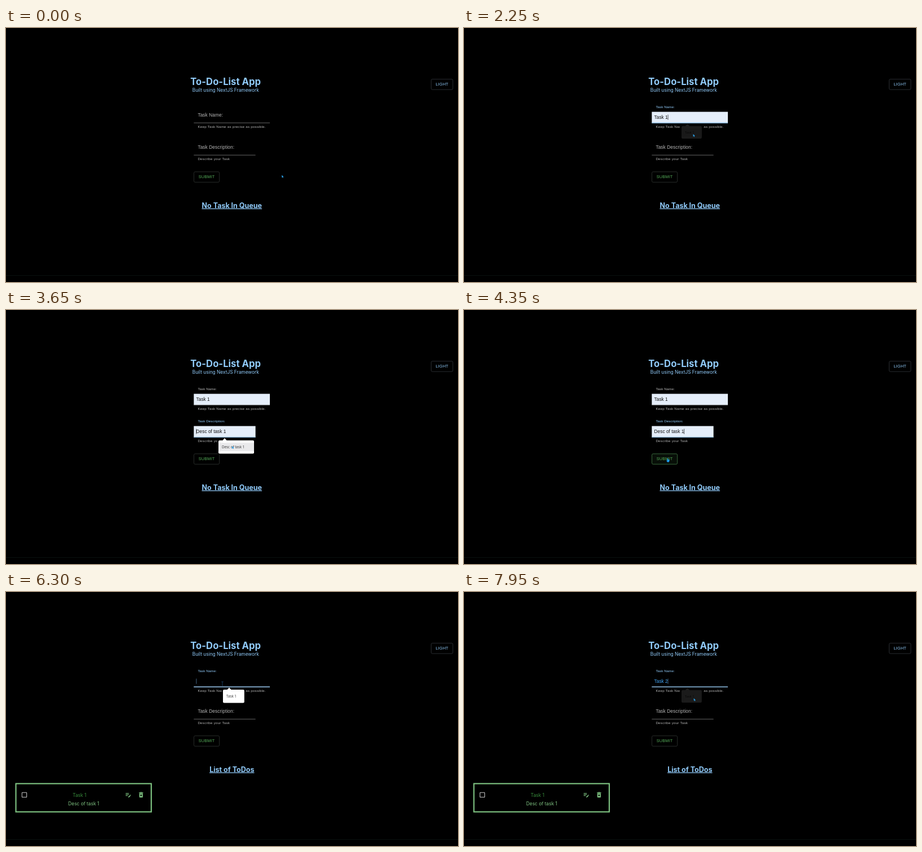
Write an HTML page that moves like this. It is 800 px wide and 450 px high and loops after 8000 ms.

```html
<!DOCTYPE html>
<html lang="en">
<head>
<meta charset="utf-8">
<title>To-Do-List App</title>
<style>
html, body { margin: 0; width: 100%; height: 100%; overflow: hidden; background: #000; }
svg { display: block; width: 100vw; height: 100vh; }
text { white-space: pre; }
.inter { font-family: Inter, sans-serif; font-size: 8.33px; }
.bold { font-weight: 700; }
.mid { text-anchor: middle; }
.ui { font-family: "Liberation Sans", Arial, sans-serif; font-size: 8.33px; }
.label { letter-spacing: .00938em; }
.help { font-size: 6.25px; letter-spacing: .0333em; fill: #b5b5b5; }
.btn { font-size: 7.29px; letter-spacing: .02857em; }
.tip { font-family: "Open Sans", sans-serif; font-size: 6.25px; fill: #333; }
</style>
</head>
<body>
<svg id="stage" viewBox="0 0 800 450"></svg>
<script>
const LOOP = 8000, STEP = 50;
const BLUE = '#90caf9', GREEN = '#81c784', GREY = '#b5b5b5';

const field = (id, y, w, label, help) => `
  <g id="${id}" transform="translate(332.4 ${y})">
    <rect class="fill" y="-19.5" width="${w}" height="19.8" fill="#e5eefa"/>
    <line class="line" x2="${w}" y1=".1" y2=".1" stroke-width=".6"/>
    <line class="focus" x1="${-w / 2}" x2="${w / 2}" stroke="${BLUE}" stroke-width="1.1"/>
    <text class="label ui">${label}</text>
    <text class="value ui" x="4.2" y="-6.9"></text>
    <rect class="caret" y="-14.5" width=".7" height="9.2"/>
    <text class="ui help" x="7" y="9.4">${help}</text>
  </g>`;

const popup = (id, x, y, w, text) => `
  <g id="${id}" transform="translate(${x} ${y})">
    <rect x="-2" y="-1" width="${w + 4}" height="25.5" rx="2" fill="#000"/>
    <g class="body">
      <path d="M7 .5L11-3.8L15 .5z" fill="#fff"/>
      <rect width="${w}" height="23.6" rx="2" fill="#fff"/>
      <rect class="band" y="4.5" width="${w}" height="14.6" fill="#e9e9eb"/>
      <text class="tip" x="6" y="14.2">${text}</text>
    </g>
  </g>`;

const stage = document.getElementById('stage');
stage.innerHTML = `
  <rect width="800" height="450"/>
  <rect y="438" width="800" height="1" fill="#08100f"/>
  <text class="inter bold mid" x="388.6" y="101" style="font-size:16.67px" fill="${BLUE}">To-Do-List App</text>
  <text class="inter mid" x="388.8" y="113" fill="${BLUE}">Built using NextJS Framework</text>
  <rect x="752.5" y="90.7" width="38.4" height="18.4" rx="2" fill="none" stroke="#3b4046" stroke-width=".7"/>
  <text class="ui btn mid" x="771.8" y="102.2" fill="${BLUE}">LIGHT</text>
  <rect id="btn" x="332.6" y="254.8" width="45" height="18.4" rx="2" fill="#66bb6a" stroke-width=".7"/>
  <text class="ui btn mid" x="355.1" y="266.4" fill="#57b05b">SUBMIT</text>
  <text id="head" class="inter bold mid" x="399.8" y="318.6" style="font-size:12.5px" text-decoration="underline" fill="${BLUE}"></text>
  <g id="card">
    <rect x="17.5" y="339.5" width="239.6" height="50" fill="none" stroke="${GREEN}" stroke-width="2.1"/>
    <rect x="28.3" y="355.3" width="8.3" height="8.3" rx=".7" fill="none" stroke="#c4c4c4" stroke-width="1.05"/>
    <text class="inter mid" x="130" y="362.5" fill="#388e3c">Task 1</text>
    <text class="inter mid" x="137.5" y="378.4" fill="${GREEN}">Desc of task 1</text>
    <g fill="${GREEN}">
      <path transform="translate(210.2 353) scale(.521)" d="M3 10h11v2H3zM3 6h11v2H3zM3 14h7v2H3zM18 12.9l.7-.7q.7-.6 1.4 0l.7.7q.6.7 0 1.4l-.7.7zM17.3 13.6L12 18.9V21h2.1l5.3-5.3z"/>
      <path transform="translate(232.8 353) scale(.521)" fill-rule="evenodd" d="M6 7h12v12q0 2-2 2H8q-2 0-2-2zM8.5 11.9L10.6 14 8.5 16.1 9.9 17.5 12 15.4 14.1 17.5 15.5 16.1 13.4 14 15.5 11.9 14.1 10.5 12 12.6 9.9 10.5zM15.5 4l-1-1h-5l-1 1H5v2h14V4z"/>
    </g>
  </g>
  ${field('name', 168, 134.6, 'Task Name:', 'Keep Task Name as precise as possible.')}
  ${field('desc', 225.1, 109.2, 'Task Description:', 'Describe your Task')}
  ${popup('nameTip', 384, 173, 37.8, 'Task 1')}
  ${popup('descTip', 376, 230.9, 63, 'Desc of task 1')}
  <g id="pointer">
    <path id="arrow" d="M0 0L.2 4.6 1.3 3.7 2 5.2 2.8 4.8 2.1 3.4 3.5 3.2z" fill="#2b9fe6"/>
    <path id="beam" d="M-1.8-3.3H1.8M0-3.3V3.5M-1 3.5H1" fill="none" stroke="#23507c" stroke-width=".7"/>
    <path id="hand" d="M-1.2-2.8H-.1V-.8L2.6-.1V2L1.7 4H-1.2L-2.7 1.4 -2.2.8-1.2 1.4z" fill="#1e9df0"/>
  </g>`;

const $ = id => document.getElementById(id);
const set = (el, attrs) => { for (const k in attrs) el.setAttribute(k, attrs[k]); };
const show = (el, on) => set(el, { visibility: on ? 'visible' : 'hidden' });
const clamp = v => Math.max(0, Math.min(1, v));
const easeOut = v => 1 - (1 - clamp(v)) ** 3;
const easeBoth = v => v * v * (3 - 2 * v);
const within = (t, spans) => spans.some(([a, b]) => t >= a && t < b);
// 0..1 level that eases in and out at the ends of each span
const level = (t, spans, ms) => spans.reduce(
  (sum, [a, b]) => sum + easeOut((t - a) / ms) - easeOut((t - b) / ms), 0);

const END = 1e5;
const path = [ // time, x, y
  [50, 488, 260.5], [850, 354.5, 155.3], [1380, 354.5, 155.3], [1750, 402, 185.8],
  [1800, 402, 185.8], [1950, 406.5, 187], [2200, 406.5, 187], [2650, 375, 213.2],
  [3000, 375, 213.2], [3550, 400, 241], [3880, 400, 241], [4300, 361, 265.4],
  [5300, 361, 265.4], [5750, 383, 162.3], [6800, 383, 162.3], [7150, 406.6, 188.2]
];
function pointerAt(t) {
  const i = path.findIndex(p => p[0] > t);
  if (i < 0) return path[path.length - 1].slice(1);
  if (i === 0) return path[0].slice(1);
  const [a, x, y] = path[i - 1], [b, u, v] = path[i];
  const k = easeBoth((t - a) / (b - a));
  return [x + (u - x) * k, y + (v - y) * k];
}

// keys: time, text, autofilled, caret at the end
const fields = [
  { id: 'name', bottom: 168, width: 134.6,
    shrink: [[950, 4850], [5950, END]], focus: [[950, 2700], [5950, END]],
    keys: [[950, '', 0, 0], [1700, 'Task 1', 1, 0], [2150, 'Task 1', 1, 1], [4850, '', 0, 0],
      [5950, '', 0, 0], [7050, 'Task 1', 1, 0], [7250, 'Task 1', 1, 1],
      [7500, 'Task ', 0, 1], [7850, 'Task 2', 0, 1]] },
  { id: 'desc', bottom: 225.1, width: 109.2,
    shrink: [[2700, 4850]], focus: [[2700, 4700]],
    keys: [[2700, '', 0, 0], [3400, 'Desc of task 1', 1, 0],
      [3850, 'Desc of task 1', 1, 1], [4850, '', 0, 0]] }
];
const tips = [
  { id: 'nameTip', open: [[1050, 2150], [6100, 7250], [7550, 7850]], hover: [[1700, 2300], [7050, 7400]] },
  { id: 'descTip', open: [[2800, 3850]], hover: [[3400, 4000]] }
];

function drawField(f, t, x, y) {
  const part = c => $(f.id).querySelector('.' + c);
  const [since, text, filled, atEnd] = f.keys.filter(k => k[0] <= t).pop() || [0, '', 0, 0];
  const small = level(t, f.shrink, 200), focused = within(t, f.focus);
  const over = x > 332 && x < 332 + f.width && y > f.bottom - 22 && y < f.bottom;
  set(part('label'), {
    transform: `translate(7 ${-11 - 14.8 * small}) scale(${1 - .25 * small})`,
    fill: focused ? BLUE : GREY
  });
  show(part('fill'), filled);
  set(part('line'), { stroke: over ? '#fff' : '#a9a9a9' });
  set(part('focus'), {
    transform: `translate(${f.width / 2} .1) scale(${level(t, f.focus, 200)} 1)`
  });
  const value = part('value');
  value.textContent = text;
  set(value, { fill: filled ? '#111' : '#42a5f5' });
  const end = atEnd ? value.getComputedTextLength() : 0;
  set(part('caret'), { x: 4.2 + end, fill: filled ? '#111' : '#5f8fb8' });
  show(part('caret'), focused && (t - since) % 1060 < 530);
  return over;
}

function drawTip(tip, t) {
  const el = $(tip.id), k = clamp(level(t, tip.open, 190));
  show(el, k > .001);
  const size = .94 + .06 * k;
  set(el.querySelector('.body'), {
    opacity: k,
    transform: `translate(${19 * (1 - size)} ${12 * (1 - size)}) scale(${size})`
  });
  set(el.querySelector('.band'), { opacity: within(t, tip.hover) ? 1 : 0 });
}

function draw(t) {
  const [x, y] = pointerAt(t);
  const overField = fields.map(f => drawField(f, t, x, y)).some(Boolean);
  tips.forEach(tip => drawTip(tip, t));

  const overBtn = x > 332 && x < 378 && y > 255 && y < 273;
  const press = clamp((t - 4700) / 150) * clamp((5500 - t) / 200);
  set($('btn'), {
    'fill-opacity': (overBtn ? .08 : 0) + .22 * press,
    stroke: overBtn ? '#4e8f52' : '#3a403b'
  });

  const listed = t >= 4850;
  $('head').textContent = listed ? 'List of ToDos' : 'No Task In Queue';
  show($('card'), listed);

  set($('pointer'), { transform: `translate(${x} ${y})` });
  show($('beam'), overField);
  show($('hand'), overBtn);
  show($('arrow'), !overField && !overBtn);
}

const start = performance.now();
function tick() {
  const t = (performance.now() - start) % LOOP;
  draw(Math.floor(t / STEP) * STEP);
  requestAnimationFrame(tick);
}
tick();
</script>
</body>
</html>
```
